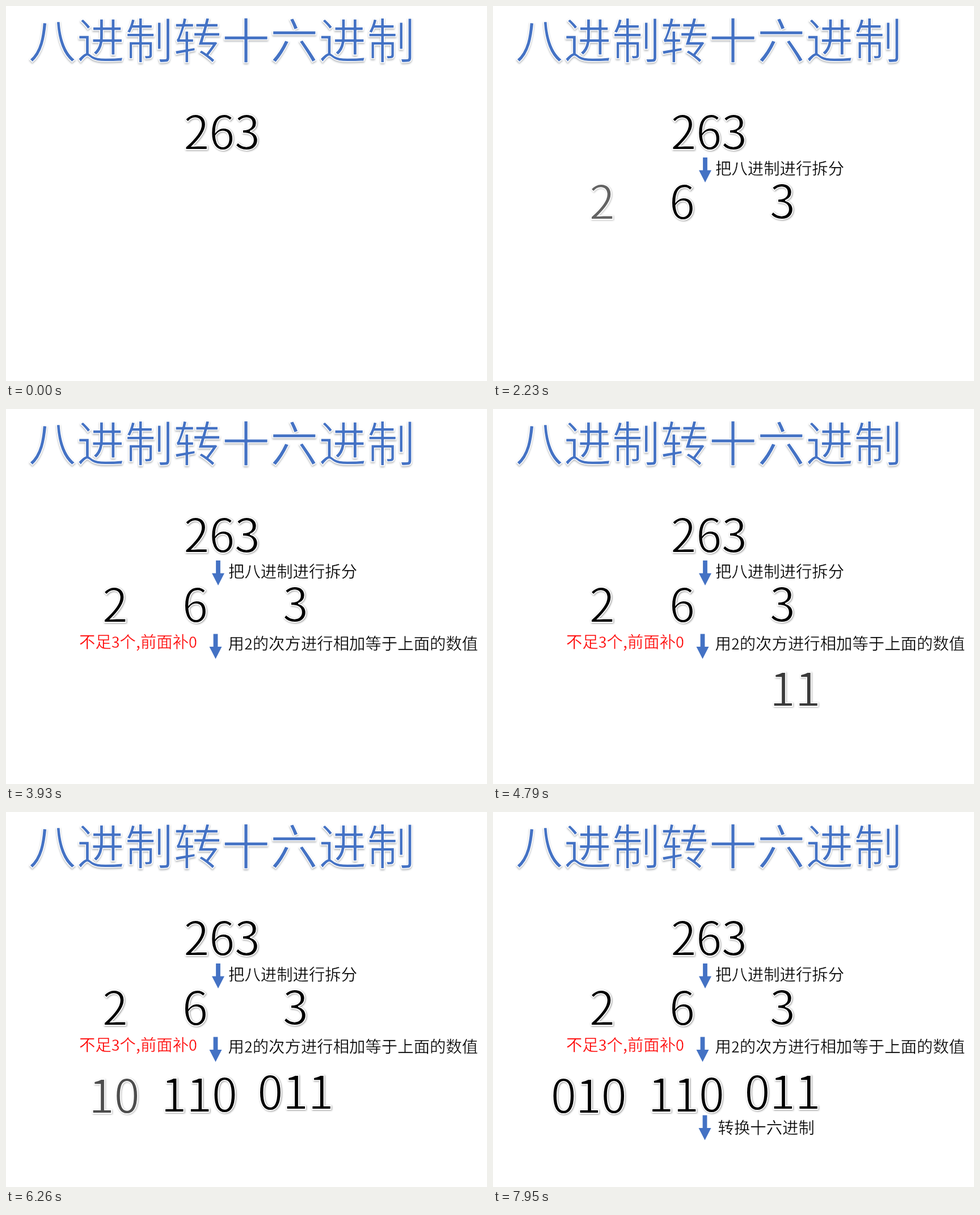
An HTML page for the animation above (8000 ms loop, 848 by 661 pixels).

```html
<!DOCTYPE html>
<html lang="zh-CN">
<head>
<meta charset="utf-8">
<title>八进制转十六进制</title>
<style>
html, body { margin: 0; height: 100%; overflow: hidden; background: #fff; }
svg { display: block; width: 100vw; height: 100vh; }
/* A white outline thins the strokes to a light weight. */
text { font-family: "Noto Sans CJK SC", "Noto Sans CJK", sans-serif; white-space: pre; stroke: #fff; }
.title { font-size: 85.3px; fill: #4472c4; stroke-width: 1.6px; filter: drop-shadow(0 2.8px 1.5px #6e747a80); }
.number { font-size: 82.5px; letter-spacing: -1.1px; stroke-width: 1.8px; filter: drop-shadow(1.6px 1.6px 1.5px #0006); }
.note { font-size: 28.4px; stroke-width: .4px; }
.note tspan { font-size: 26.7px; }
.red { fill: #f00; }
path { fill: #4472c4; }
</style>
</head>
<body>
<svg viewBox="0 0 848 661"></svg>
<script>
const LOOP = 8000, STEP = 77, FADE = 500, ARROW_FADE = 200;
const svg = document.querySelector('svg');
const fades = [];

function add(tag, attributes, start, duration) {
  const node = document.createElementNS('http://www.w3.org/2000/svg', tag);
  for (const name in attributes) node.setAttribute(name, attributes[name]);
  svg.append(node);
  if (start !== undefined) fades.push({ node, start, duration });
  return node;
}

function text(kind, content, x, y, start) {
  const node = add('text', { class: kind, x, y }, start, FADE);
  node.innerHTML = kind.startsWith('note')
    ? content.replace(/\d/g, '<tspan>$&</tspan>')
    : content;
}

function arrow(x, y, start) {
  const d = `M${x - 3.9} ${y}h7.8v22.5h7.1l-11 21.5l-11-21.5h7.1z`;
  add('path', { d }, start, ARROW_FADE);
}

text('title', '八进制转十六进制', 39, 93);
text('number', '263', 313, 253);

arrow(374, 267, 233);
text('note', '把八进制进行拆分', 392, 297, 430);
text('number', '3', 487.5, 374.8, 930);
text('number', '6', 310.5, 375.8, 1430);
text('number', '2', 169.5, 375.8, 1930);

arrow(369.5, 396.5, 2735);
text('note', '用2的次方进行相加等于上面的数值', 391.5, 424, 2930);
text('note red', '不足3个,前面补0', 129, 421, 3430);

text('number', '11', 487.5, 523.8, 4389);
text('number', '0', 443, 525.3, 4889);
text('number', '110', 273, 528.8, 5389);
text('number', '10', 145.5, 530.8, 5889);
text('number', '0', 101.5, 530.8, 6389);

arrow(373.5, 534.5, 7090);
text('note', '转换十六进制', 396.5, 566.5, 7389);

const origin = performance.now();

function draw(now) {
  const elapsed = Math.max(0, now - origin) % LOOP;
  // The picture advances in steps of about 13 per second.
  const time = Math.floor(elapsed / STEP + 0.1) * STEP;
  for (const { node, start, duration } of fades) {
    const opacity = Math.min(1, Math.max(0, (time - start) / duration));
    node.setAttribute('opacity', opacity);
  }
  requestAnimationFrame(draw);
}
draw(origin);
</script>
</body>
</html>
```
